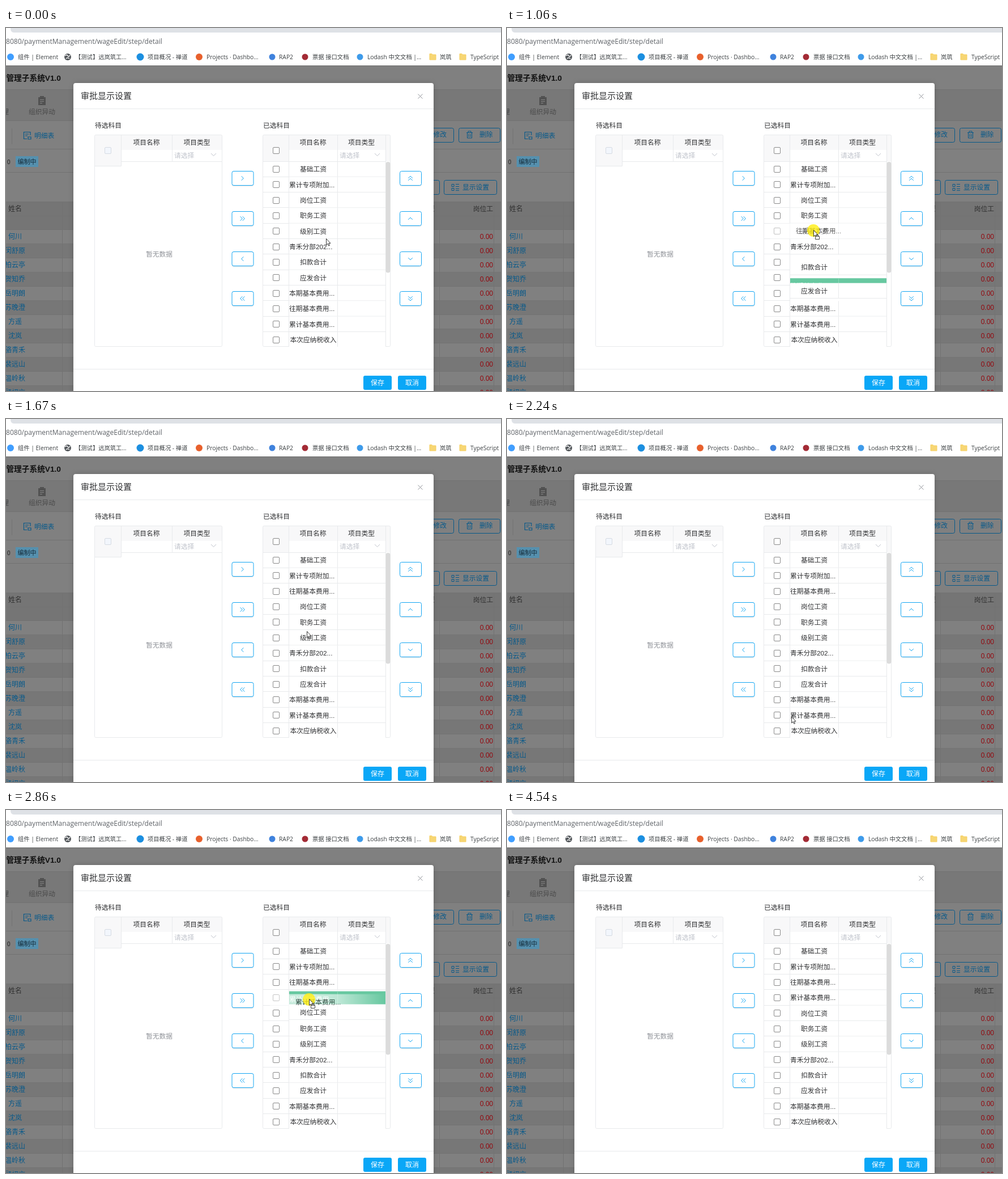
An HTML page for the animation above (5550 ms loop, 874 by 640 pixels).

```html
<!DOCTYPE html>
<html lang="zh">
<head>
<meta charset="utf-8">
<title>审批显示设置</title>
<style>
  html, body { margin: 0; width: 100%; height: 100%; overflow: hidden; background: #fff; }
  svg { display: block; width: 874px; height: 640px; }
  text { font-family: "Liberation Sans", "Noto Sans CJK SC", "Noto Sans CJK", sans-serif; white-space: pre; }
  .browser text { font-family: "Open Sans", "Noto Sans CJK SC", "Noto Sans CJK", sans-serif; }
  .row rect { fill: #fff; }
  .row text { fill: #303133; }
  .row path { stroke: #e8eaec; }
  .lifted rect { fill: #67c8a0; }
  .lifted text { fill: #fff; }
  .lifted path { stroke: #8ad4b5; }
</style>
</head>
<body>
<svg id="stage" viewBox="0 0 874 640" xmlns="http://www.w3.org/2000/svg"></svg>
<script>
const LOOP = 5550, ROW_H = 27.33, BODY_TOP = 235.4, SWAP_MS = 100;
const BLUE = '#12a5f2', DIM_BLUE = '#07598a', LINE = '#e8eaec';

const ITEMS = ['基础工资', '累计专项附加...', '岗位工资', '职务工资', '级别工资', '青禾分部202...',
  '扣款合计', '应发合计', '本期基本费用...', '往期基本费用...', '累计基本费用...', '本次应纳税收入'];
const PEOPLE = ['何川', '闵舒原', '柏云亭', '贺知乔', '岳明朗', '苏晚澄', '方遥', '沈岚', '骆青禾', '裴远山', '温岭秋', '顾初言'];

// cross: when the row at each index starts to make way
const DRAGS = [
  { from: 9, to: 2, start: 732, drop: 1517, grab: [531, 493],
    cross: { 8: 925, 7: 976, 6: 1027, 5: 1110, 4: 1200, 3: 1270, 2: 1340 } },
  { from: 10, to: 3, start: 2390, drop: 3050, grab: [524, 517],
    cross: { 9: 2395, 8: 2410, 7: 2430, 6: 2445, 5: 2600, 4: 2680, 3: 2768 } }
];

// Screen refreshes: [first, last, count]
const REFRESH = [[0, 0, 1], [70, 600, 7], [650, 1060, 6], [1130, 1130, 1], [1210, 1670, 7], [1770, 2300, 8],
  [2390, 2530, 3], [2620, 2860, 4], [2910, 2910, 1], [3050, 3530, 8], [3610, 3610, 1], [3850, 4380, 8], [4460, 4540, 2]]
  .flatMap(([a, b, n]) => Array.from({ length: n }, (_, i) => n > 1 ? a + (b - a) * i / (n - 1) : a));

// Pointer path: [time, x, y]
const PATH = [[0, 565, 371], [160, 592, 402], [250, 595, 432], [340, 560, 468], [430, 495, 478], [600, 531, 489],
  [650, 531, 493], [732, 531, 493], [896, 536, 462], [978, 539, 425], [1060, 541, 356], [1210, 540, 318], [1363, 537, 276],
  [1517, 533, 300], [1670, 531, 374], [1846, 600, 420], [1921, 671, 490], [1997, 640, 549], [2148, 480, 532],
  [2300, 524, 517], [2390, 526, 500], [2530, 536, 386], [2620, 536, 368], [2860, 535, 333], [3050, 535, 335],
  [3200, 590, 420], [3400, 715, 590], [3530, 748, 622], [3850, 737, 623], [4077, 586, 533], [4229, 690, 590],
  [4380, 828, 622], [4460, 843, 626]];

const clamp01 = v => Math.max(0, Math.min(1, v));

function text(x, cy, str, size = 11.75, fill = '#303133', anchor = 'start', extra = '') {
  return `<text x="${x}" y="${cy + size * .37}" font-size="${size}" fill="${fill}" text-anchor="${anchor}" ${extra}>${str}</text>`;
}
const rect = (x, y, w, h, fill, extra = '') => `<rect x="${x}" y="${y}" width="${w}" height="${h}" fill="${fill}" ${extra}/>`;
const path = (d, stroke, extra = '') => `<path d="${d}" fill="none" stroke="${stroke}" ${extra}/>`;
const dot = (x, y, r, fill) => `<circle cx="${x}" cy="${y}" r="${r}" fill="${fill}"/>`;
const folder = x => path(`M${x} 45.5h4l1.5 1.5h5.5v9h-11z`, '#f5cf62', 'style="fill:#f7d674"');

function browser() {
  const mark = '#3c4043';
  const label = (x, s) => text(x, 51, s, 10.3, mark);
  return `<g class="browser">${rect(0, 0, 874, 67, '#fff')}
    <path d="M8 0H874V8H14Q8 8 8 0Z" fill="#dee1e6"/>
    ${text(0, 23.5, '8080/paymentManagement/wageEdit/step/detail', 12.06, '#5f6368')}
    ${dot(8, 51, 6, '#409eff')}${label(21, '组件 | Element')}
    ${dot(109, 51, 6, '#53575b')}<path d="M104 49q4-3 5 0t4-1M106 54q3-3 6 0" fill="none" stroke="#fff" stroke-width="1.3"/>
    ${label(122, '【测试】远岚筑工...')}
    ${dot(237, 51, 6.5, '#1c8fe0')}${label(250, '项目概况 - 禅道')}
    ${dot(341, 51, 6, '#e8602c')}${label(354, 'Projects · Dashbo...')}
    ${dot(470, 51, 5.5, '#3f82dd')}${label(482, 'RAP2')}
    ${dot(528, 51, 5.5, '#a32b35')}${label(541, '票据 接口文档')}
    ${dot(625, 51, 5.5, '#3e9bea')}${label(638, 'Lodash 中文文档 |...')}
    ${folder(748)}${label(766, '岚筑')}${folder(801)}${label(820, 'TypeScript')}
  </g>`;
}

function dimButton(x, y, w) {
  return rect(x + .5, y + .5, w, 25, 'none', `rx="3" stroke="${DIM_BLUE}"`);
}

function page() {
  const ink = '#434446', line = '#727272';
  let s = rect(0, 66, 874, 574, '#808080') + rect(0, 108, 874, 55, '#787878') +
    rect(0, 306, 874, 49, '#757575');
  s += path('M0 66.5H874', '#707070') + path('M0 108.5H874M0 163.5H874M0 213.5H874M0 254.5H874', line);
  s += text(97, 88, '管理子系统V1.0', 13.7, '#101010', 'end', 'font-weight="bold"');
  s += text(5, 148, '理', 11.75, ink, 'end') + text(40, 148, '组织异动', 11.75, '#494949');
  s += `<path d="M57 122h3v-2h7v2h3v14H57z" fill="#515151"/>` + path('M60 126.5h7M60 129.5h7M60 132.5h4', '#858585');
  s += path('M10.5 177V205', line);
  s += path('M43 189V183.500H31.500V195.500H37M34 187h6M34 190h4M39 192h5v4h-5z', DIM_BLUE, 'stroke-width="1.2"') + text(50, 190, '明细表', 11.75, DIM_BLUE);
  s += text(2, 236, '0', 10, '#202020') + rect(17, 226, 40, 19, '#5590ae') + text(37, 235.500, '编制中', 11, '#142a38', 'middle');
  s += dimButton(720, 176, 70) + text(778, 188, '修改', 11.75, DIM_BLUE, 'end');
  s += dimButton(799, 176, 73) + path('M813 184.500h11M816 184v-2h5v2M814.500 185v9h8v-9M817 187v5M820 187v5', DIM_BLUE) + text(836, 188, '删除', 11.75, DIM_BLUE);
  s += dimButton(700, 268, 65) + dimButton(773, 268, 93);
  s += path('M787 275.500h4v4h-4zM787 282.500h4v4h-4zM794 275.500h6M794 279.500h6M794 283.500h6M794 286.500h6', DIM_BLUE) + text(806, 280.500, '显示设置', 11.75, DIM_BLUE);
  for (let i = 0; i < PEOPLE.length; i++) {
    const y = 368 + 25 * i;
    if (i % 2) s += rect(0, y - 12.5, 874, 25, '#777');
    s += path(`M0 ${y + 12.5}H874`, line) + text(16, y, PEOPLE[i], 12, DIM_BLUE, 'middle') + text(860, y, '0.00', 12, '#920a10', 'end');
  }
  s += path('M0 306.500H874M0 331.500H874M0 355.500H874M99.500 306V640M765.500 306V640M861.500 306V640', line);
  s += text(4, 319, '姓名', 12, '#303030') + text(757, 319, '资', 12, '#303030', 'end') + text(860, 319, '岗位工', 11.75, '#303030', 'end');
  return s;
}

const checkbox = (x, cy, off) => rect(x + .5, cy - 5.5, 11, 11, off ? '#f2f6fc' : '#fff', `rx="1.500" stroke="${off ? '#d6dbe3' : '#8a8a8a'}"`);

function moveButton(x, cy, dir, double) {
  const angle = { right: 0, down: 90, left: 180, up: 270 }[dir];
  const one = dx => `M${dx - 1.8} -3.800L${dx + 1.8} 0L${dx - 1.8} 3.800`;
  return rect(x + .5, cy - 11.5, 38, 26, '#000', 'rx="3" opacity=".07"') +
    rect(x + .5, cy - 12.5, 38, 25, '#fff', `rx="3" stroke="${BLUE}"`) +
    path(double ? one(-2) + one(2) : one(0), BLUE, `transform="translate(${x + 19} ${cy}) rotate(${angle})"`);
}

function tableHead(left, nameX, typeX, endX, width) {
  const mid = (a, b) => (a + b) / 2;
  return rect(nameX, 189, left + width - nameX, 26, '#f8f8f9') +
    text(mid(nameX, typeX), 202, '项目名称', 11.75, '#303133', 'middle') +
    text(mid(typeX, endX), 202, '项目类型', 11.75, '#303133', 'middle') +
    text(typeX + 4, 225, '请选择', 11.75, '#c0c4cc') +
    path(`M${endX - 19} 221l4.500 4.500 4.500-4.500`, '#c0c4cc') +
    path(`M${nameX + .5} 189V235M${typeX + .5} 189V235M${nameX} 235.500H${endX}`, LINE);
}

function dialog() {
  let s = rect(119, 97, 636, 560, '#000', 'rx="4" opacity=".18" filter="url(#soft)"') + rect(119, 97, 636, 560, '#fff', 'rx="4"');
  s += path('M119 142.500H755M119 601.500H755', LINE) + text(132, 119, '审批显示设置', 15) + path('M727.500 116.500l8 8m0-8l-8 8', '#909399');
  s += text(157, 172, '待选科目') + text(454, 172, '已选科目');
  s += rect(157, 189, 46, 54, '#f8f8f9') + tableHead(157, 203, 293, 381, 225) + path('M157 243.500H203.500V235', LINE);
  s += rect(156.5, 188.5, 225, 373, 'none', `rx="2" stroke="${LINE}"`) + checkbox(174, 216, true);
  s += text(270.5, 399, '暂无数据', 11.75, '#909399', 'middle');
  s += rect(454, 189, 46, 46, '#f8f8f9') + rect(671, 189, 8, 46, '#f8f8f9') + tableHead(454, 499, 585, 670, 225) + path('M454 235.500H499M670.500 189V562', LINE);
  s += rect(453.5, 188.5, 225, 373, 'none', `rx="2" stroke="${LINE}"`) + checkbox(471, 216) + path('M499.500 235V562', LINE);
  ITEMS.forEach((_, i) => {
    const y = BODY_TOP + ROW_H * i;
    s += checkbox(471, Math.round(y + 13.7)) + (i < 11 ? path(`M454 ${Math.round(y + ROW_H) - .5}H499`, LINE) : '');
  });
  s += rect(670.5, 236, 8, 195.5, '#dcdcdc', 'rx="4"');
  [['right', 0, 'up', 1], ['right', 1, 'up', 0], ['left', 0, 'down', 0], ['left', 1, 'down', 1]].forEach(([a, da, b, db], i) => {
    const y = 265 + 70.8 * i;
    s += moveButton(398.5, Math.round(y), a, da) + moveButton(695, Math.round(y), b, db);
  });
  for (const [x, label] of [[631, '保存'], [692, '取消']]) {
    s += rect(x, 613, 50, 25, '#0aa7f7', 'rx="3"') + text(x + 25, 625.5, label, 12, '#fff', 'middle');
  }
  return s;
}

function rowLabel(name) {
  const cut = name.endsWith('...');
  return text(cut ? 500 : 542.5, 13.7, name, 11.75, '', cut ? 'start' : 'middle');
}
const row = name => `<g class="row">${rect(500, 0, 170, ROW_H, '')}${rowLabel(name)}${path(`M500 ${ROW_H - .5}H670M585.500 0V${ROW_H}`, '')}</g>`;

const stage = document.getElementById('stage');
stage.innerHTML = `<defs>
    <filter id="soft" x="-10%" y="-10%" width="120%" height="120%"><feGaussianBlur stdDeviation="5"/></filter>
    <clipPath id="body"><rect x="500" y="236" width="171" height="326"/></clipPath>
    <radialGradient id="fade"><stop offset="0" stop-color="#fff" stop-opacity=".72"/><stop offset=".4" stop-color="#fff" stop-opacity=".55"/><stop offset="1" stop-color="#fff" stop-opacity="0"/></radialGradient>
    <mask id="halo" maskUnits="userSpaceOnUse" x="400" y="-150" width="300" height="300"><circle id="haloDisc" cy="13" r="135" fill="url(#fade)"/></mask>
  </defs>
  ${browser()}${page()}${dialog()}
  <g clip-path="url(#body)"><g id="rows">${ITEMS.map(row).join('')}</g></g>
  <g id="ghost"><g mask="url(#halo)">${rect(455, 0, 216, ROW_H, '#fff')}<g id="ghostText"></g></g></g>
  <g id="pointer">
    <circle id="press" cy="1" r="11" fill="#ffee10" opacity=".8"/>
    <path id="arrow" d="M.5 .5V11.500L3 9.200L4.700 13L6.400 12.300L4.800 8.600H8Z" fill="#fff" stroke="#222" stroke-width=".9"/>
    <path id="parcel" d="M3.500 11.500h7v5h-7zM5 11.500v-2h4v2" fill="#fff" stroke="#333" stroke-width=".9"/>
    <path id="hand" d="M-1.300 8V.800Q0-.800 1.300 .800V5L5.200 6Q6 6.500 5.800 8L5 11.500V14H-1V12L-4.300 8.500Q-4.500 6.500-2.800 7Z" fill="#fff" stroke="#222" stroke-width="1"/>
  </g>`;

const el = id => document.getElementById(id);
const rowsBox = el('rows'), rowNodes = [...rowsBox.children];
const show = (id, on) => el(id).setAttribute('display', on ? 'inline' : 'none');

function pointerAt(t) {
  const k = PATH.findIndex(p => p[0] > t);
  if (k < 0) return PATH[PATH.length - 1].slice(1);
  const [t0, x0, y0] = PATH[k - 1], [t1, x1, y1] = PATH[k], u = (t - t0) / (t1 - t0);
  return [x0 + (x1 - x0) * u, y0 + (y1 - y0) * u];
}

let held = null;
function render(time) {
  const t = REFRESH.filter(r => r <= time + .5).pop();
  const [x, y] = pointerAt(t);
  const order = ITEMS.map((_, i) => i);
  for (const d of DRAGS) if (t >= d.drop) order.splice(d.to, 0, order.splice(d.from, 1)[0]);

  const drag = DRAGS.find(d => t >= d.start && t < d.drop);
  const slots = order.map((_, i) => i);
  if (drag) {
    for (const [key, at] of Object.entries(drag.cross)) {
      const i = +key, lag = i > 5 ? 36 : 0;
      slots[i] += clamp01((t - at) / SWAP_MS);
      slots[drag.from] -= clamp01((t - lag - at) / SWAP_MS);
    }
  }
  const lifted = drag ? order[drag.from] : -1;
  order.forEach((item, i) => {
    rowNodes[item].setAttribute('transform', `translate(0 ${BODY_TOP + ROW_H * slots[i]})`);
    rowNodes[item].classList.toggle('lifted', item === lifted);
  });
  if (drag && rowsBox.firstChild !== rowNodes[lifted]) rowsBox.prepend(rowNodes[lifted]);

  show('ghost', drag);
  if (drag) {
    const [gx, gy] = drag.grab;
    el('ghost').setAttribute('transform', `translate(${x - gx} ${BODY_TOP + ROW_H * drag.from + y - gy})`);
    el('haloDisc').setAttribute('cx', gx);
    if (held !== lifted) el('ghostText').innerHTML = rowLabel(ITEMS[lifted]);
    held = lifted;
  }

  const hand = t >= 3850 && t < 3920;
  show('pointer', !(t >= 3610 && t < 3850) && t < 4540);
  el('pointer').setAttribute('transform', `translate(${x} ${y})`);
  show('press', drag || (t >= 650 && t < 732));
  show('arrow', !hand);
  show('parcel', drag);
  show('hand', hand);
}

const origin = performance.now();
function tick() {
  render((performance.now() - origin) % LOOP);
  requestAnimationFrame(tick);
}
tick();
</script>
</body>
</html>
```
